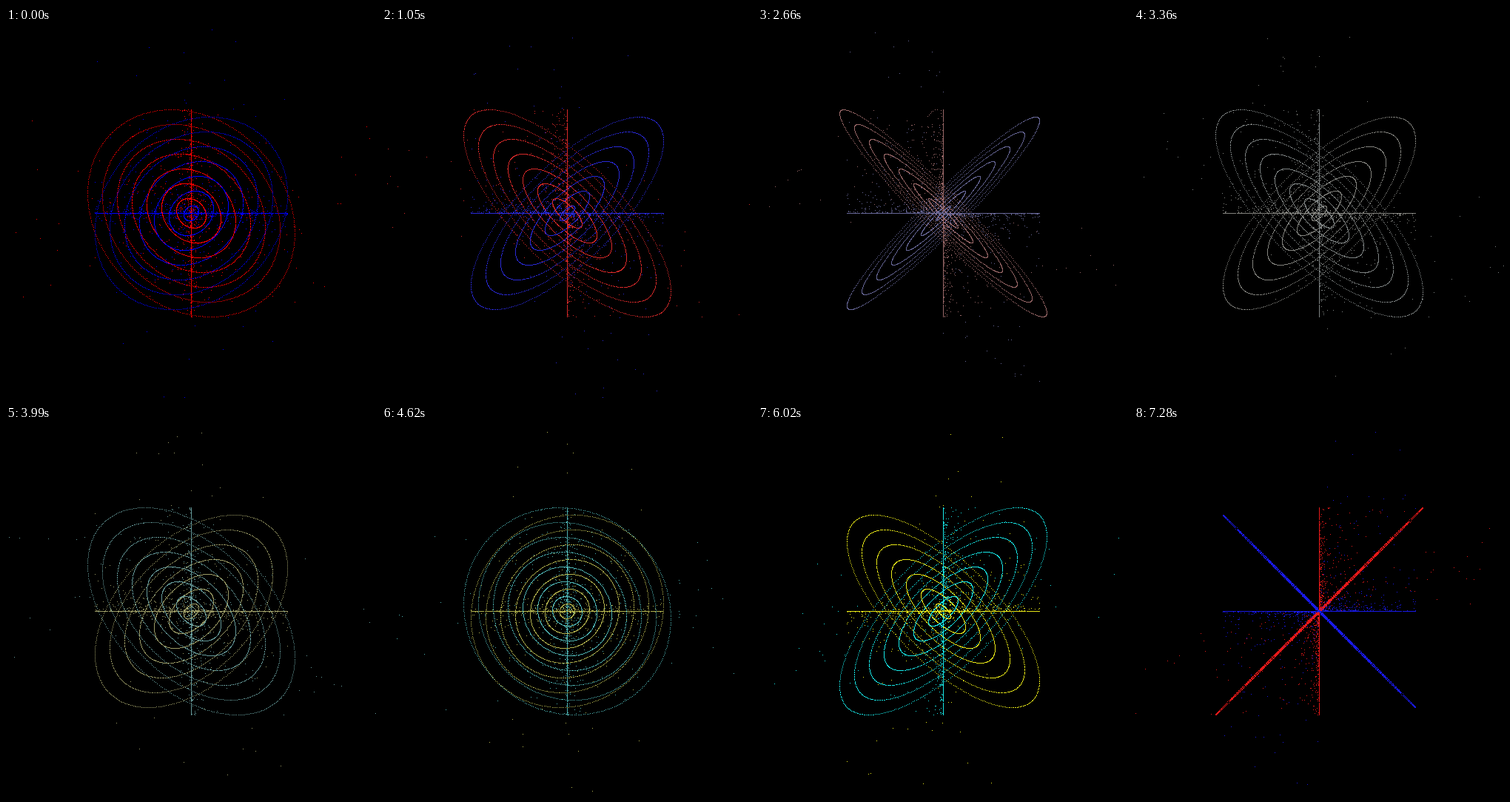
Animation, 500 px wide and 500 px high, one loop 7350 ms. Source, as an HTML page with a canvas:

```html
<!DOCTYPE html>
<html lang="en">
<head>
<meta charset="utf-8">
<title>Phase figures</title>
<style>
  html, body { margin: 0; width: 100%; height: 100%; overflow: hidden; background: #000; }
  canvas { display: block; width: 500px; height: 500px; image-rendering: pixelated; }
</style>
</head>
<body>
<canvas id="stage" width="500" height="500"></canvas>
<script>
const ctx = document.getElementById('stage').getContext('2d');
const SIZE = 500, MID = 250, STEP_MS = 70, STEPS = 105;
const POINTS = 360, SPRAY_EVERY = 3, SPREAD = 0.11, RAD = Math.PI / 180;

function seeded(seed) {
  let s = seed * 7919 + 17;
  return () => {
    s = (s + 0x6D2B79F5) | 0;
    let t = Math.imul(s ^ (s >>> 15), 1 | s);
    t = (t + Math.imul(t ^ (t >>> 7), 61 | t)) ^ t;
    return ((t ^ (t >>> 14)) >>> 0) / 4294967296;
  };
}

function dot(x, y) {
  ctx.fillRect(Math.round(MID + x), Math.round(MID + y), 1, 1);
}

// One tilted ring, its axis points and the long-tailed spray beside the axis.
function drawLevel(r, phase, upright, rand) {
  const flip = upright ? 1 : -1;
  const axisDot = (along, across) => upright ? dot(across, along) : dot(along, across);
  for (let i = 0; i < POINTS; i++) {
    const a = r * Math.cos(i * RAD);
    const b = r * Math.cos(i * RAD + phase);
    dot(a, flip * b);
    axisDot(a, 0);
    if (i % SPRAY_EVERY === 0) {
      axisDot(a, SPREAD * b * Math.tan(rand() * Math.PI / 2) ** 2);
    }
  }
}

function draw(step) {
  const phase = (step * 2.5 - 79) * RAD;
  const v = Math.round(step * 2.7) % 256;
  const rand = seeded(step + 1);
  ctx.fillStyle = '#000';
  ctx.fillRect(0, 0, SIZE, SIZE);
  for (let r = 140; r > 0; r -= 20) {
    ctx.fillStyle = `rgb(${255 - v}, ${v}, ${v})`;
    drawLevel(r, phase, true, rand);
    ctx.fillStyle = `rgb(${v}, ${v}, ${255 - v})`;
    drawLevel(r - 10, phase, false, rand);
  }
}

const start = performance.now();
let shown = -1;

function tick() {
  const elapsed = performance.now() - start;
  const step = Math.floor(elapsed / STEP_MS) % STEPS;
  if (step !== shown) {
    draw(step);
    shown = step;
  }
  requestAnimationFrame(tick);
}

tick();
</script>
</body>
</html>
```
